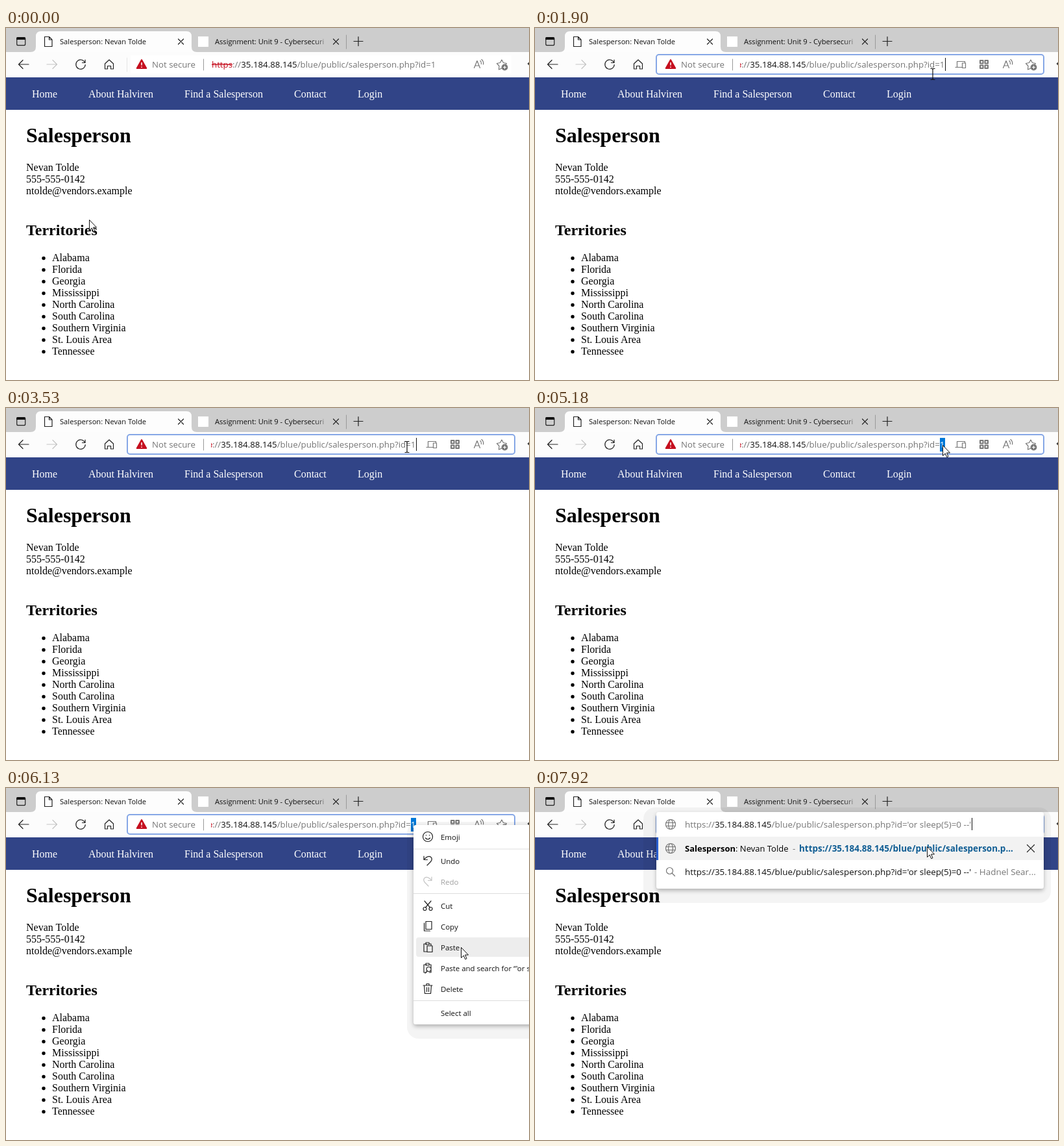
An HTML page that plays this animation: 806 by 542 pixels, repeating every 8000 ms.

```html
<!DOCTYPE html>
<html lang="en">
<head>
<meta charset="utf-8">
<title>Salesperson page</title>
<style>
  html, body { margin: 0; width: 100%; height: 100%; overflow: hidden; background: #fff; }
  svg { display: block; width: 100vw; height: 100vh; }
  text { white-space: pre; }
  .ui { font-family: "Open Sans", "Noto Sans", sans-serif; }
  .page { font: 16px "Liberation Serif", "Times New Roman", serif; }
  .tab { font-size: 11.15px; fill: #111; }
  .url { font-size: 13.27px; }
  .drop { font-size: 13.46px; }
  .menu { font-size: 11.45px; fill: #111; }
  .line { fill: none; stroke: #222; stroke-width: 1.2; stroke-linejoin: round; stroke-linecap: round; }
  .soft { stroke: #777; }
  .grey { fill: #767676; }
  .pale { stroke: #c4c4c4; }
</style>
</head>
<body>
<svg viewBox="0 0 806 542" preserveAspectRatio="none">
  <defs>
    <linearGradient id="fade"><stop offset="0" stop-color="#cdcdcd" stop-opacity="0"/><stop offset="1" stop-color="#cdcdcd"/></linearGradient>
    <filter id="shadow" x="-10%" y="-20%" width="120%" height="150%">
      <feDropShadow dx="0" dy="3" stdDeviation="3" flood-opacity=".28"/>
    </filter>
    <clipPath id="fieldClip"><rect id="fieldRect" x="316" y="42" width="400" height="28"/></clipPath>
    <clipPath id="selClip"><rect id="selRect" y="46" width="0" height="21"/></clipPath>
    <g id="globe" class="line soft">
      <circle r="7.5"/><ellipse rx="3.4" ry="7.5"/><path d="M-7-2.5H7M-7 2.5H7"/>
    </g>
    <path id="cross" d="M-4-4 4 4M4-4-4 4" class="line"/>
  </defs>

  <rect width="806" height="542" fill="#fff"/>

  <!-- tab strip -->
  <rect width="806" height="37" fill="#cdcdcd"/>
  <path d="M38 37Q46 37 46 29V13Q46 5 54 5H278Q286 5 286 13V29Q286 37 294 37Z" fill="#fdfdfd"/>
  <rect y="37" width="806" height="39" fill="#fcfcfc"/>
  <g class="ui tab">
    <rect x="16.7" y="14.7" width="13" height="12" rx="2" class="line"/>
    <path d="M16 18V16Q16 14 18 14H28Q30 14 30 16V18Z"/>
    <path d="M59.5 13.5H66.5L71 18V28.5H59.5ZM66.5 13.5V18H71" class="line"/>
    <text x="83" y="25">Salesperson: Nevan Tolde</text>
    <use href="#cross" x="269.5" y="21"/>
    <rect x="296" y="13" width="16" height="16" fill="#fff"/>
    <text x="322" y="25">Assignment: Unit 9 - Cybersecuri</text>
    <rect x="474" y="8" width="26" height="26" fill="url(#fade)"/>
    <use href="#cross" x="508.5" y="21"/>
    <path d="M524.5 11V32" class="line" style="stroke:#999;stroke-width:1"/>
    <path d="M536 20.5H550M543 13.5V27.5" class="line"/>
  </g>

  <!-- toolbar -->
  <path d="M35 56H20M26 49.5 19.5 56 26 62.5" class="line"/>
  <path d="M63 56H78M72 49.5 78.5 56 72 62.5" class="line pale"/>
  <path d="M121.5 53A7.2 7.2 0 1 0 122.2 56.5M122 49V53.5H117.5" class="line"/>
  <path d="M152.5 55 159 49 165.500 55V63H161.500V58.500H156.500V63H152.500Z" class="line"/>
  <path d="M186.500 46V67" class="line" style="stroke:#e8e8e8"/>
  <path d="M806 52.500 803.500 55 806 57.500Z" fill="#333"/>
  <rect x="192" y="42" width="587" height="28" fill="#fff"/>
  <rect id="ring" x="187" y="41" width="597" height="30" rx="4" fill="#fff" stroke="#86a7e6" stroke-width="2"/>
  <path d="M209 49 216.300 62H201.700Z" fill="#c50f1f" stroke="#c50f1f" stroke-width="2" stroke-linejoin="round"/>
  <path d="M209 53V57.500M209 59.500V61" stroke="#fff" stroke-width="1.500"/>
  <text x="225" y="61" class="ui url grey">Not secure</text>
  <path d="M304.500 48V65" class="line" style="stroke:#999;stroke-width:1"/>
  <g id="focusIcons" class="line soft">
    <path d="M658 60.500H648M650.500 60V51.500H662.500V53M658.500 54H663.500V61.500H658.500Z"/>
    <path d="M686 50H690.500V54.500H686ZM693.500 50H698V54.500H693.500ZM686 57.500H690.500V62H686ZM693.500 57.500H698V62H693.500Z" stroke-width="2"/>
  </g>
  <g class="line soft">
    <path d="M721.500 61.500 726 50.500 730.500 61.500M723 58H729M731 50.500Q733 52.500 732.500 55.500M733 48.500Q736.500 51.500 735.500 56"/>
    <path d="M764 62 759.500 64 760 58.500 756.500 54.500 761.500 53.500 764 49 766.500 53.500 771.500 54.500 770 56.500"/>
    <circle cx="768.500" cy="60.500" r="4.300" fill="#777"/>
    <path d="M766.500 60.500H770.500M768.500 58.500V62.500" style="stroke:#fff"/>
  </g>
  <g clip-path="url(#fieldClip)" class="ui url"><g class="scroll" id="url"></g></g>
  <g clip-path="url(#selClip)" class="ui url">
    <rect x="300" y="40" width="400" height="34" fill="#0078d7"/>
    <g class="scroll" id="urlSelected"></g>
  </g>
  <path id="caret" d="M0 46V66" stroke="#111" stroke-width="1"/>

  <!-- page -->
  <rect y="76" width="806" height="50" fill="#314487"/>
  <g id="page" class="page"></g>

  <!-- context menu -->
  <g id="menu" class="ui menu">
    <rect x="618" y="52" width="220" height="334" rx="18" opacity=".045"/>
    <rect x="628" y="57" width="240" height="307" rx="4" fill="#fff" filter="url(#shadow)"/>
    <rect id="hover" x="632" width="200" height="30" rx="4" fill="#ededed"/>
    <path d="M628 94H806M628 162.500H806M628 327.500H806" stroke="#ddd"/>
    <g id="menuRows"></g>
  </g>

  <!-- address suggestions -->
  <g id="suggest" class="ui drop">
    <rect x="167" y="30" width="628" height="147" rx="18" opacity=".045"/>
    <rect x="187" y="37" width="597" height="118" rx="4" fill="#fff" filter="url(#shadow)"/>
    <rect x="187" y="75" width="597" height="36" fill="#f2f2f2"/>
    <rect x="187" y="76" width="3" height="35" fill="#2a5fd0"/>
    <use href="#globe" x="209" y="56"/>
    <use href="#globe" x="209" y="93"/>
    <g class="line soft"><circle cx="207.500" cy="127.500" r="5"/><path d="M211.500 131.500 215.500 135.500"/></g>
    <text x="231" y="61" class="grey">https://<tspan fill="#111">35.184.88.145</tspan>/blue/public/salesperson.php?id='or sleep(5)=0 --'</text>
    <path d="M673.500 46V65" stroke="#111"/>
    <text x="231" y="98" font-size="13"><tspan font-weight="700">Salesperson</tspan>: Nevan Tolde</text>
    <text x="397" y="98" class="grey">-</text>
    <text x="407" y="98" font-weight="700" fill="#115e94">https://35.184.88.145/blue/public/salesperson.p...</text>
    <path d="M758.500 87.500 769.500 98.500M769.500 87.500 758.500 98.500" class="line"/>
    <text x="231" y="134" fill="#111">https://35.184.88.145/blue/public/salesperson.php?id='or sleep(5)=0 --'</text>
    <text x="677" y="134" class="grey">- Hadnel Sear...</text>
  </g>

  <path id="arrow" d="M.5.500V16.500L4.200 13 6.700 18.700 9 17.700 6.500 12H11.500Z" fill="#fff" stroke="#111"/>
  <path id="beam" d="M-3.500-8.500H-1L0-7.500 1-8.500H3.500M0-7.500V7.500M-3.500 8.500H-1L0 7.500 1 8.500H3.500" fill="none" stroke="#111" stroke-width="1.200"/>
</svg>

<script>
const LOOP = 8000;
const $ = id => document.getElementById(id);
const show = (id, on) => $(id).style.display = on ? '' : 'none';
const label = (x, y, text, extra = '') => `<text x="${x}" y="${y}" ${extra}>${text}</text>`;

// Page content
const nav = [[40, 'Home'], [127, 'About Halviren'], [275, 'Find a Salesperson'], [444, 'Contact'], [542, 'Login']];
const contact = ['Nevan Tolde', '555-555-0142', 'ntolde@vendors.example'];
const states = ['Alabama', 'Florida', 'Georgia', 'Mississippi', 'North Carolina', 'South Carolina',
  'Southern Virginia', 'St. Louis Area', 'Tennessee'];
$('page').innerHTML =
  nav.map(([x, s]) => label(x, 107, s, 'fill="#fff"')).join('') +
  label(31, 176, 'Salesperson', 'font-size="32" font-weight="700"') +
  contact.map((s, i) => label(31, 220 + 18 * i, s)).join('') +
  label(31, 319, 'Territories', 'font-size="24" font-weight="700"') +
  states.map((s, i) => `<circle cx="58" cy="${354.5 + 18 * i}" r="2.700"/>` + label(71, 359 + 18 * i, s)).join('');

// Address text, coloured normally or white inside a selection
const address = (red, grey, black) => `<text x="317" y="61" fill="${grey}">` +
  `<tspan fill="${red}" text-decoration="line-through">https</tspan>://` +
  `<tspan fill="${black}">35.184.88.145</tspan>/blue/public/salesperson.php?id=1</text>`;
$('url').innerHTML = address('#c50f1f', '#767676', '#111');
$('urlSelected').innerHTML = address('#fff', '#fff', '#fff');

// Context menu: centre line, label, icon drawn around the origin
const clip = 'M-2-5H-6V7H-2M-3-7H2V-4H-3ZM2-5H5V-2';
const rows = [
  [75, 'Emoji', 'M-7.500 0A7.500 7.500 0 1 0 7.500 0A7.500 7.500 0 1 0-7.500 0M-3.500 2Q0 6 3.500 2M-2.500-2.500V-2M2.500-2.500V-2'],
  [112, 'Undo', 'M-6-7V-1.500H-.500M-6-2 -1-6Q4-8 6-4Q7-1 4 2L-1 7'],
  [144, 'Redo', 'M6-7V-1.500H.500M6-2 1-6Q-4-8-6-4Q-7-1-4 2L1 7'],
  [181, 'Cut', 'M-5-7 3.500 3M5-7-3.500 3M-7 5A2.500 2.500 0 1 0-2 5A2.500 2.500 0 1 0-7 5M2 5A2.500 2.500 0 1 0 7 5A2.500 2.500 0 1 0 2 5'],
  [213, 'Copy', 'M-3-7.500H6V4.500H-3ZM-5.500-5V7H3.500'],
  [245, 'Paste', clip + 'M-1-2H7V7.500H-1Z'],
  [277, 'Paste and search for “\'or sleep', clip + 'M-2 2A3.500 3.500 0 1 1 5 2A3.500 3.500 0 1 1-2 2M-1 5-4 8M5-2V7H2'],
  [309, 'Delete', 'M-7-5H7M-2-5V-7.500H2V-5M-5.500-5-4.500 7.500H4.500L5.500-5M-1.500-2V4.500M1.500-2V4.500'],
  [346, 'Select all', ''],
];
$('menuRows').innerHTML = rows.map(([y, name, icon]) => {
  const off = name === 'Redo';
  return `<path class="line ${off ? 'pale' : ''}" transform="translate(650 ${y})" d="${icon}"/>` +
    label(670, y + 5, name, off ? 'fill="#a0a0a0"' : '');
}).join('');

// Pointer moves: first step, last step, number of steps, destination
const moves = [
  [130, 1060, 8, 660, 56], [1210, 1360, 2, 662, 60], [1480, 1630, 2, 630, 71], [1900, 1900, 1, 613, 71],
  [2200, 2620, 4, 630, 61], [2750, 2880, 2, 718, 50], [3010, 3140, 2, 634, 46], [3260, 3400, 2, 601, 62],
  [3520, 3660, 2, 634, 58], [3980, 4490, 4, 625, 57], [5030, 5180, 2, 628, 57], [5470, 5470, 1, 629, 60],
  [5730, 6130, 4, 701, 245], [6780, 7500, 6, 545, 46], [7640, 7770, 2, 559, 58], [7920, 7920, 1, 604, 90],
];

function pointerAt(t) {
  let x = 128, y = 295;
  for (const [start, end, steps, toX, toY] of moves) {
    if (t < start) break;
    const done = t >= end ? 1 : (Math.floor((t - start) / (end - start) * (steps - 1)) + 1) / steps;
    x += (toX - x) * done;
    y += (toY - y) * done;
  }
  return [Math.round(x), Math.round(y)];
}

function selectionAt(t) {
  if (t >= 930 && t < 1210) return [317, 634];
  if (t >= 4250 && t < 6500) return [624, 632];
  return [0, 0];
}

function render(t) {
  const [x, y] = pointerAt(t);
  const focused = t >= 930, menuOpen = t >= 5470 && t < 6500;
  const atStart = t < 1210 || (t >= 2330 && t < 2880);
  const [from, to] = selectionAt(t);

  show('ring', focused);
  show('focusIcons', focused);
  show('menu', menuOpen);
  show('suggest', t >= 6500);

  for (const g of document.querySelectorAll('.scroll')) g.setAttribute('transform', `translate(${atStart ? 0 : -31} 0)`);
  $('fieldRect').setAttribute('width', focused ? 318 : 400);
  $('selRect').setAttribute('x', from);
  $('selRect').setAttribute('width', to - from);
  show('caret', focused && to === 0);
  $('caret').setAttribute('transform', `translate(${atStart ? 628.5 : 632.5} 0)`);

  const row = rows.find(r => Math.abs(r[0] - y) <= 16);
  show('hover', row);
  if (row) $('hover').setAttribute('y', row[0] - 15);

  const beam = y > 38 && y < 74 && (t < 5030 || t >= 6500);
  show('beam', beam);
  show('arrow', !beam);
  $(beam ? 'beam' : 'arrow').setAttribute('transform', `translate(${x} ${y})`);
}

function tick() {
  render(performance.now() % LOOP);
  requestAnimationFrame(tick);
}
tick();
</script>
</body>
</html>
```
